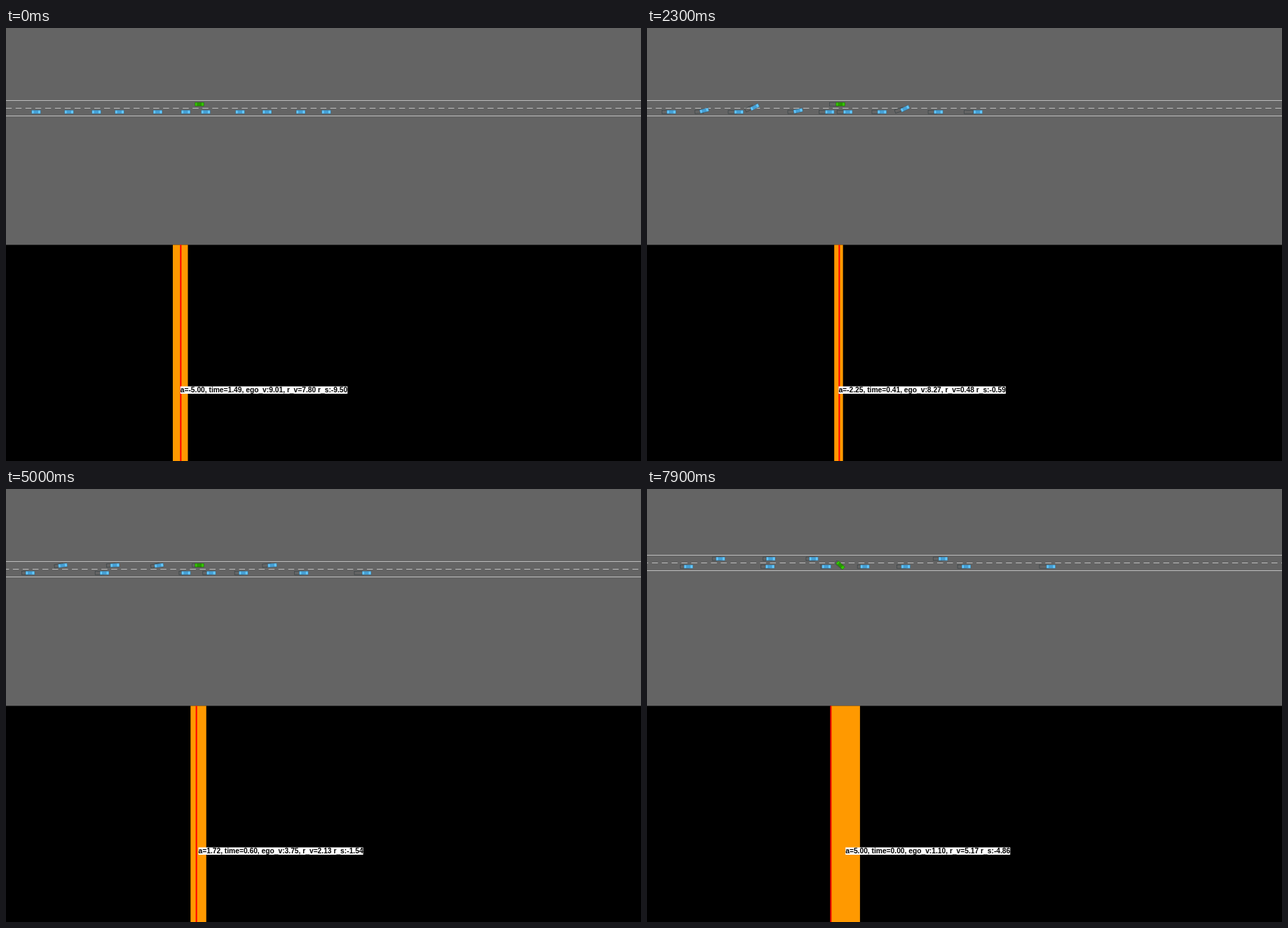
An HTML page with a canvas that plays this animation: 906x618 px, repeating every 8 s.

```html
<!DOCTYPE html>
<html lang="en">
<head>
<meta charset="utf-8">
<title>Lane merge</title>
<style>
html, body { margin: 0; width: 100%; height: 100%; overflow: hidden; background: #000; }
canvas { display: block; }
</style>
</head>
<body>
<canvas id="stage" width="906" height="618"></canvas>
<script>
const ctx = document.getElementById('stage').getContext('2d');
const LOOP = 8000, START = 600, TRAIL = 380;
const SCALE = 2.806, STRIPE = 5 * SCALE, HORIZON = 309.5;
const EGO_X = 276, EGO_Y = 108.8, LOWER = 16.3, LANE = 11.1;
const BLUE = ['#64c8ff', '#469fd4'];
const GREEN = ['#32c800', '#289600'];

// x: first place, speed: px/s, brake: share of the ego car's travel lost,
// surge: brief gain in px, merge: time at which a lane change starts
const cars = [
  { x: 43, speed: 13.5, brake: .79, surge: 3 },
  { x: 90, speed: 13.1, brake: .775, surge: 3, merge: 1580 },
  { x: 129, speed: 17.3, brake: .77, surge: 6 },
  { x: 162, speed: 10.9, brake: .62, surge: 0, merge: 700 },
  { x: 216.5, speed: 10.2, brake: .513, surge: 4, merge: 1650 },
  { x: 256.5, speed: .95, brake: .08, surge: 6 },
  { x: 285, speed: 8.66, brake: .36, surge: 2.5 },
  { x: 334, speed: 16.4, brake: .82, surge: 9 },
  { x: 372.5, speed: 20.4, brake: .947, surge: 2, merge: 1100 },
  { x: 420.5, speed: 14.5, brake: .676, surge: 0 },
  { x: 457, speed: 24.1, brake: .536, surge: -2.5 }
];
const [rear, front] = [cars[5], cars[6]];

// Key values of the label: t, a, time, ego_v, r_v, r_s
const readout = [
  [START, -5, 1.49, 9.01, 7.8, -9.5],
  [1300, -2.27, .56, 9.84, 1.07, -1.18],
  [2300, -2.25, .41, 8.27, .48, -.59],
  [4000, -1.56, .48, 5.36, .77, -.84],
  [6000, 5, .72, 2.14, 3.5, -2.25],
  [7100, -.14, .93, 2.28, 3.66, -3.66],
  [7900, 5, 0, 1.1, 5.17, -4.86]
];

const seconds = t => (t - START) / 1000;

function ease(t, from, to) {
  const u = Math.max(0, Math.min(1, (t - from) / (to - from)));
  return u * u * (3 - 2 * u);
}

// Distance driven by the ego car: cosine braking down to a crawl
function travel(t) {
  const s = seconds(t), stop = 6.5, crawl = 4.4, drop = 22.3;
  return crawl * s + drop * (s / 2 + stop / (2 * Math.PI) * Math.sin(Math.PI * s / stop));
}

const egoTurn = t => ease(t, 5000, 8000);
const roadTop = t => 103.5 - 9.1 * egoTurn(t);

function carX(car, t) {
  const s = seconds(t), surge = s / 1.7 * Math.exp(1 - s / 1.7);
  return car.x + car.speed * s - car.brake * travel(t) + car.surge * surge;
}

function carPose(car, t) {
  const u = car.merge ? Math.max(0, t - car.merge) / 500 : 0;
  const fade = Math.exp(-u);
  return {
    x: carX(car, t),
    y: LOWER - LANE * (1 - fade * (1 + u + u * u / 2)),
    tilt: -21 * u ** 3 * fade
  };
}

const egoPose = t => ({ x: EGO_X, y: EGO_Y - roadTop(t), tilt: 44 * egoTurn(t) });

// Regular 100 ms updates at first, then ever longer pauses
function simTime(t) {
  const snap = v => Math.floor(v / 100) * 100;
  const slow = n => snap(2665 + 255 * n + 4.65 * n * n);
  if (t < 700) return START;
  if (t < slow(1)) return Math.min(snap(t), 2500);
  let n = 1;
  while (slow(n + 1) <= t) n++;
  return slow(n);
}

function drawCar(x, y, tilt, colours) {
  ctx.save();
  ctx.translate(x, y);
  ctx.rotate(tilt * Math.PI / 180);
  if (colours) {
    ctx.fillStyle = colours[0];
    ctx.fillRect(-6.5, -2.6, 13, 5.2);
    ctx.fillStyle = colours[1];
    ctx.fillRect(-3.5, -2.3, 6.5, 4.6);
  }
  ctx.strokeStyle = colours ? 'rgba(0,0,0,.35)' : 'rgba(30,45,50,.6)';
  ctx.lineWidth = .7;
  ctx.strokeRect(-6.3, -2.5, 12.6, 5);
  ctx.restore();
}

function drawVehicle(pose, colours, t) {
  const top = roadTop(t), now = pose(t);
  if (t > START) {
    const past = Math.max(START, t - TRAIL), before = pose(past);
    drawCar(before.x + travel(past) - travel(t), top + before.y, before.tilt);
  }
  drawCar(now.x, top + now.y, now.tilt, colours);
}

function drawRoad(t) {
  const top = Math.floor(roadTop(t));
  ctx.fillStyle = '#646464';
  ctx.fillRect(0, 0, 906, HORIZON);
  ctx.fillStyle = '#bebebe';
  ctx.fillRect(0, top, 906, 1);
  ctx.fillRect(0, top + 22, 906, 1);
  for (let x = (111.9 - travel(t)) % STRIPE - STRIPE; x < 906; x += STRIPE) {
    ctx.fillRect(x, top + 11, 8.5, 1);
  }
}

function labelValues(t) {
  let i = 0;
  while (i < readout.length - 2 && t >= readout[i + 1][0]) i++;
  const from = readout[i], to = readout[i + 1];
  const u = (t - from[0]) / (to[0] - from[0]);
  return from.slice(1).map((v, k) => v + (to[k + 1] - v) * u);
}

// The gap between two cars, reached from a place further back
function drawGap(t) {
  const away = 1 - ease(t, START, 1300);
  const left = carX(rear, t) + 6.5 - 25 * away;
  const right = carX(front, t) - 7 - 18.5 * away;
  const values = labelValues(t);
  const [a, time, egoV, relV, relS] = values.map(v => v.toFixed(2));
  ctx.fillStyle = '#ff9900';
  ctx.fillRect(left, HORIZON, right - left, 309);
  ctx.fillStyle = '#ff0000';
  ctx.fillRect(EGO_X - 1 + SCALE * values[4], HORIZON, 2, 309);

  const label = `a=${a}, time=${time}, ego_v:${egoV}, r_v=${relV} r_s:${relS}`;
  const x = (left + right) / 2;
  ctx.font = 'bold 10.25px "Liberation Sans", Arial, sans-serif';
  ctx.fillStyle = '#fff';
  ctx.fillRect(x, 511.5, ctx.measureText(label).width, 10.5);
  ctx.fillStyle = '#000';
  ctx.fillText(label, x, 520);
}

function draw() {
  const t = simTime(performance.now() % LOOP);
  ctx.fillStyle = '#000';
  ctx.fillRect(0, 0, 906, 618);
  drawRoad(t);
  for (const car of cars) drawVehicle(s => carPose(car, s), BLUE, t);
  drawVehicle(egoPose, GREEN, t);
  drawGap(t);
  requestAnimationFrame(draw);
}

draw();
</script>
</body>
</html>
```
